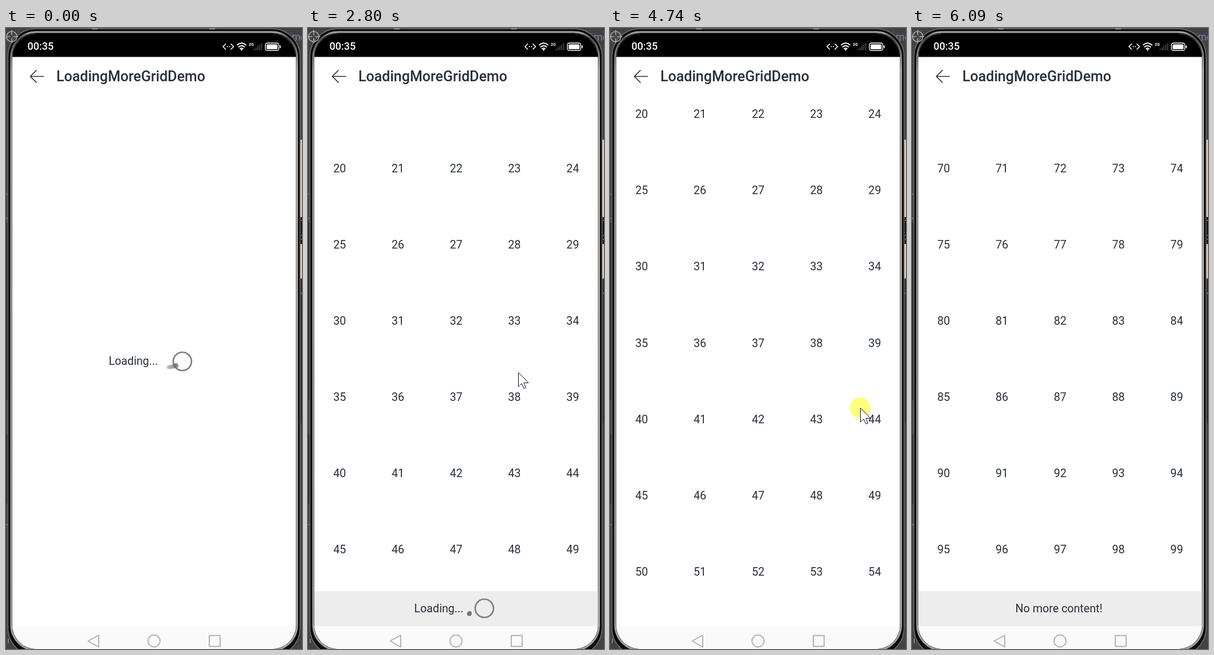
These frames come from a looping animation (517 by 1084 pixels, 6560 ms). An HTML page:

```html
<!DOCTYPE html>
<html lang="en">
<head>
<meta charset="utf-8">
<title>LoadingMoreGridDemo</title>
<style>
html, body { margin: 0; width: 100%; height: 100%; overflow: hidden; background: #424244; }
svg { display: block; width: 517px; height: 1084px; }
text { font-family: Roboto, "Noto Sans", sans-serif; font-size: 19.7px; fill: #27303d; }
.line { fill: none; stroke-linecap: round; stroke-linejoin: round; }
</style>
</head>
<body>
<svg viewBox="0 0 517 1084">
  <defs>
    <clipPath id="screen"><rect x="11" y="10" width="495.5" height="1074" rx="42"/></clipPath>
    <clipPath id="list"><rect x="11" y="118" width="495.5" height="926"/></clipPath>
    <linearGradient id="rim" x2="0" y2="1">
      <stop offset="0" stop-color="#aaa8a6"/><stop offset=".01" stop-color="#55524f"/>
      <stop offset=".06" stop-color="#aaa6a2"/><stop offset="1" stop-color="#a5a29f"/>
    </linearGradient>
  </defs>

  <!-- desktop behind the phone -->
  <rect width="517" height="1084" fill="#424244"/>
  <path d="M0 340H3V650H0zM0 710H3V830H0zM514 440H517V690H514z" fill="#303032"/>
  <path d="M513 195h4v135h-4zM513 377h4v60h-4z" fill="#d9c4b5"/>
  <path d="M513 330h4v47h-4z" fill="#151515"/>
  <path d="M515 336h2M515 362h2M515 369h2M0 332h2M0 867h2M0 290h2M515 463h2M4 1066v8" stroke="#bbb"/>
  <text x="499" y="22" style="font-size:18px;fill:#7d83a8">me</text>

  <!-- phone body -->
  <rect x="3.5" y="1.5" width="510" height="1094" rx="48" fill="#111" stroke="#77726d" stroke-width="1.5"/>
  <rect x="6" y="4" width="505" height="1089" rx="46" fill="none" stroke="#080808" stroke-width="3"/>
  <rect x="9" y="7" width="499.5" height="1079" rx="44" fill="none" stroke="url(#rim)" stroke-width="3"/>
  <path d="M150 1.5h10M355 1.5h10" stroke="#999" stroke-width="2"/>
  <g class="line" stroke="#aaa" stroke-width="1.6">
    <circle cx="10" cy="15" r="9"/><path d="M10 4v8M10 18v8M-1 15h8M13 15h8"/>
  </g>

  <g clip-path="url(#screen)">
    <rect x="11" y="10" width="496" height="1074" fill="#fff"/>
    <rect x="11" y="10" width="496" height="40.5"/>
    <text x="37.5" y="38.2" style="font-size:18px;font-weight:500;fill:#fff">00:35</text>
    <g class="line" stroke="#fff" stroke-width="1.7">
      <path d="M383.500 28l-4.500 4.500 4.500 4.500M393 28l4.500 4.500-4.500 4.500"/>
      <path d="M386.500 32.500h.1M390.200 32.500h.1" stroke-width="2"/>
      <path d="M404 29.500q7.500-6.500 15 0M406.500 33q5-4.200 10 0M409 36.200q2.500-2 5 0" stroke-width="1.9"/>
      <rect x="453" y="26.200" width="23.500" height="13" rx="3.500" stroke-width="1.400"/>
      <path d="M479 31v3.500"/>
    </g>
    <circle cx="411.500" cy="38" r="1.500" fill="#fff"/>
    <rect x="455.200" y="28.400" width="19" height="8.600" rx="1.500" fill="#fff"/>
    <text x="424" y="31" style="font-size:7px;font-weight:700;fill:#fff">2G</text>
    <path d="M433.500 39v-3M436.800 39v-5M440 39v-8M443.200 39v-10.500M446.500 39v-13" stroke="#4a4a4a" stroke-width="1.700"/>

    <path class="line" d="M65.500 84.500H42.500M53 74L42.500 84.500 53 95" stroke="#27303d" stroke-width="1.700"/>
    <text x="88" y="93" style="font-size:25px;font-weight:500">LoadingMoreGridDemo</text>

    <g clip-path="url(#list)">
      <g id="grid">
        <g id="foot">
          <rect x="11" width="496" height="61" fill="#ededed"/>
          <text id="note" y="37.3"></text>
        </g>
      </g>
      <text id="wait" x="179.500" y="588">Loading...</text>
      <g id="spin">
        <circle r="16" fill="none" stroke="#808080" stroke-width="2.700"/>
        <g id="comet" fill="#6f6f6f"></g>
      </g>
    </g>

    <rect x="11" y="1044" width="496" height="40" fill="#fafafa"/>
    <g class="line" stroke="#b2b2b2" stroke-width="1.900">
      <path d="M143.500 1070L162 1060V1080.500z"/>
      <circle cx="258.500" cy="1070" r="10.500"/>
      <rect x="355" y="1060.500" width="19" height="19"/>
    </g>
  </g>

  <g id="mouse" stroke="#111" fill="#fff">
    <circle id="press" r="18" fill="#ff0" fill-opacity=".5" stroke="none"/>
    <path id="arrow"/>
  </g>
</svg>
<script>
const LOOP = 6560, TICKS = 96;
const ROW = 133.15, TOP = 118, VIEW = 983;
const SHOWN = 18, RELOADED = 62;
const ARROW = "M.5.5V25L6.200 19.700 10 28.200 13.500 26.700 10 18.300H18z";
const RESIZE = "M0 0H12L8 4 22 18 26 14V26H14L18 22 4 8 0 12z";

// [tick, value...], linear in between
const scrollPath = [[27, 0], [28, 20], [30, 160], [32, 385], [33, 466.5], [66, 466.5],
  [69, 561], [71, 720], [73, 980], [76, 1430], [78, 1697], [79, 1798]];
const mousePath = [[4, 503, 1044], [6, 488, 960], [8, 472, 835], [9, 464, 761], [23, 464, 761],
  [27, 295, 735], [28, 295, 735], [31, 333, 520], [32, 340, 489], [33, 352, 541],
  [37, 367, 601], [44, 367, 601], [47, 400, 740], [50, 468, 955], [52, 495, 1029],
  [54, 499, 1045], [59, 499, 1045], [62, 428, 998], [65, 405, 900], [66, 405, 885],
  [69, 437, 663], [71, 448, 540], [73, 465, 640], [78, 494, 952], [83, 490, 958],
  [86, 478, 1000], [89, 450, 1090]];

const $ = id => document.getElementById(id);
const set = (el, attrs) => { for (const k in attrs) el.setAttribute(k, attrs[k]); };
const show = (el, on) => { el.style.display = on ? "" : "none"; };
const move = (el, x, y) => set(el, { transform: `translate(${x} ${y})` });
const make = (tag, parent, attrs) => {
  const el = document.createElementNS("http://www.w3.org/2000/svg", tag);
  set(el, attrs);
  return parent.appendChild(el);
};

function along(path, n) {
  const i = path.findIndex(p => p[0] > n);
  if (i == 0) return path[0].slice(1);
  if (i < 0) return path[path.length - 1].slice(1);
  const a = path[i - 1], b = path[i], f = (n - a[0]) / (b[0] - a[0]);
  return a.slice(1).map((v, k) => v + (b[k + 1] - v) * f);
}

const cells = Array.from({ length: 100 }, (_, i) => {
  const el = make("text", $("grid"), {
    x: 55.2 + i % 5 * 101.8, y: 185.5 + Math.floor(i / 5) * ROW, "text-anchor": "middle"
  });
  el.textContent = i;
  return el;
});
const dots = Array.from({ length: 16 }, () => make("circle", $("comet"), {}));

// Comet on a flat tilted orbit; its tail is longest on the near side
function drawComet(degrees) {
  const head = degrees * Math.PI / 180, tilt = -0.35;
  const tail = (1 + Math.sin(head)) / 2;
  dots.forEach((dot, i) => {
    const a = head + tail * (15 - i) / 15;
    const u = 28 * Math.cos(a), v = 3.5 * Math.sin(a);
    set(dot, {
      cx: u * Math.cos(tilt) - v * Math.sin(tilt),
      cy: u * Math.sin(tilt) + v * Math.cos(tilt),
      r: (4 + 0.5 * Math.sin(head)) * (0.7 + 0.3 * i / 15),
      opacity: i == 15 ? 0.8 : 0.03 + 0.012 * i
    });
  });
}

function draw(n) {
  const waiting = n < SHOWN, loaded = n >= RELOADED;
  const [scroll] = along(scrollPath, n);
  const footY = TOP + ROW * (loaded ? 20 : 10);

  show($("wait"), waiting);
  show($("grid"), !waiting);
  move($("grid"), 0, -scroll);
  cells.forEach((c, i) => show(c, i < 50 || loaded));
  move($("foot"), 0, footY);
  $("note").textContent = loaded ? "No more content!" : "Loading...";
  set($("note"), { x: loaded ? 180.5 : 185.5 });

  show($("spin"), !loaded);
  move($("spin"), 308, waiting ? 582 : footY - scroll + 1013 - VIEW);
  drawComet(waiting ? 118 - 20.5 * n : -45 - 20.5 * (n - 52));

  const [x, y] = along(mousePath, n);
  show($("mouse"), n >= 4 && n < 89 && !(n > 54 && n < 60));
  move($("mouse"), x, y);
  set($("arrow"), { d: x > 493 && y > 1020 ? RESIZE : ARROW });
  show($("press"), (n >= 27 && n < 32) || (n >= 65 && n < 72));
}

function frame(now) {
  const t = now % LOOP;
  draw(Math.min(TICKS - 1, Math.floor((t + 20) * TICKS / LOOP)));
  requestAnimationFrame(frame);
}
draw(0);
requestAnimationFrame(frame);
</script>
</body>
</html>
```
